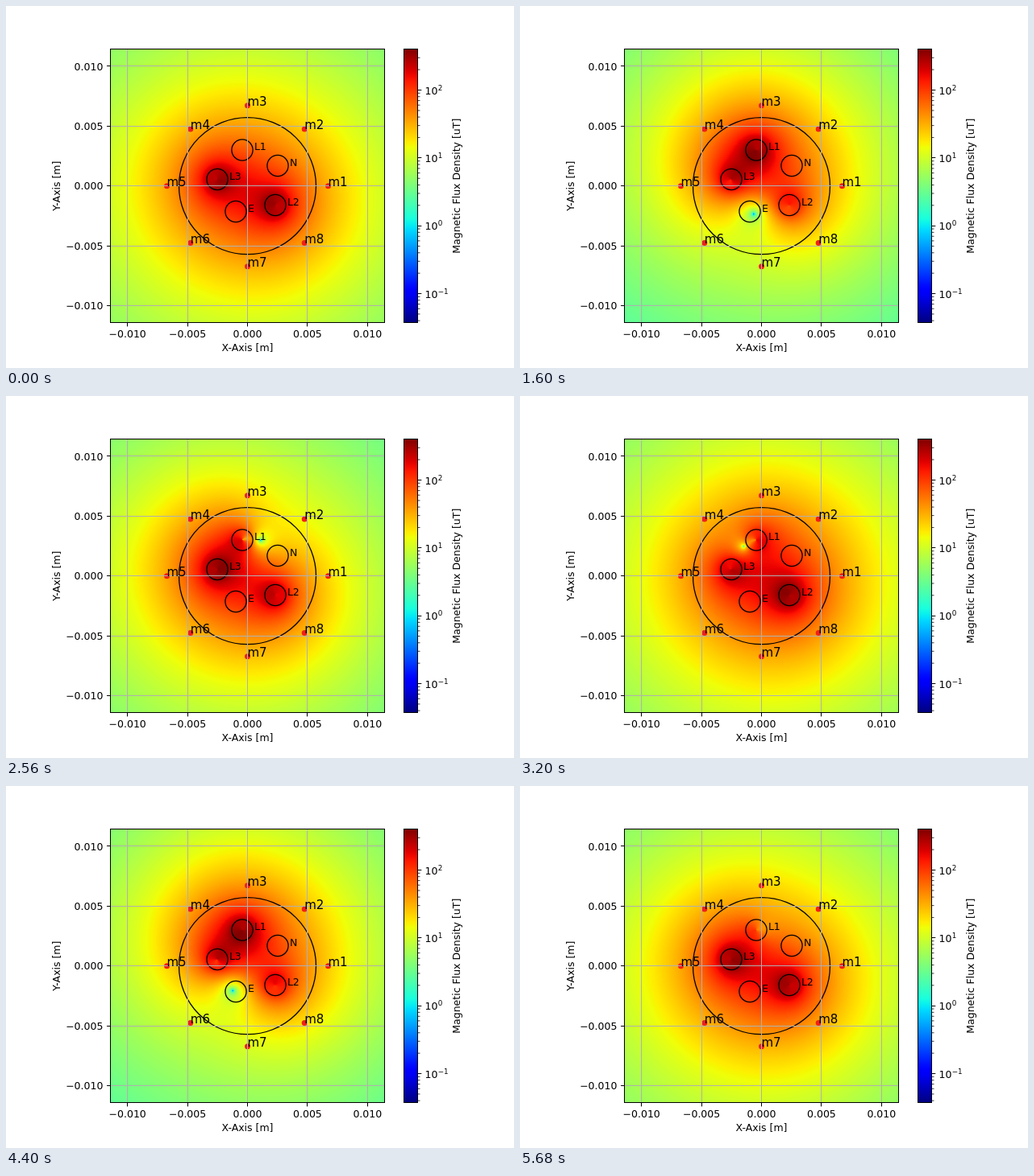
These frames come from a looping animation (630 px wide and 450 px high, 5.76 s). An HTML page with a canvas:

```html
<!DOCTYPE html>
<html lang="en">
<head>
<meta charset="utf-8">
<title>Magnetic flux density of a cable</title>
<style>
  html, body { margin: 0; width: 100%; height: 100%; overflow: hidden; background: #fff; }
  #stage { position: relative; width: 630px; height: 450px; overflow: hidden; }
  canvas { position: absolute; left: 130px; top: 54px; }
  svg { position: absolute; left: 0; top: 0; font: 12.5px "DejaVu Sans", sans-serif; }
</style>
</head>
<body>
<div id="stage">
  <canvas id="field" width="340" height="340"></canvas>
  <svg id="plot" width="630" height="450" viewBox="0 0 630 450"></svg>
</div>
<script>
const STEP = 80, STEPS = 72;
const CX = 299.5, CY = 223.7, PX_PER_MM = 14.88;
const LOG_MIN = -1.427, LOG_MAX = 2.599;
const WIRE_R = 13.1;
const PEAK = 0.2 * Math.SQRT2 * 1000 * PX_PER_MM;   // uT at 1 px for 1 A rms

// phase is in degrees; conductors without one carry no current
const wires = [
  { name: "L1", x: 293, y: 179, phase: 0 },
  { name: "L2", x: 334, y: 247.5, phase: -120 },
  { name: "L3", x: 262, y: 215.5, phase: 120 },
  { name: "N", x: 337, y: 198.5 },
  { name: "E", x: 285, y: 255.5 }
];
const phases = wires.filter(w => "phase" in w);

// Jet colour map as piecewise linear channels
const ramp = (pts, v) => {
  if (v <= pts[0][0]) return pts[0][1];
  for (let i = 1; i < pts.length; i++) {
    const [a, p] = pts[i - 1], [b, q] = pts[i];
    if (v <= b) return p + (q - p) * (v - a) / (b - a);
  }
  return pts[pts.length - 1][1];
};
const channels = [
  [[.35, 0], [.66, 1], [.89, 1], [1, .5]],
  [[.125, 0], [.375, 1], [.64, 1], [.91, 0]],
  [[0, .5], [.11, 1], [.34, 1], [.65, 0]]
];
const jet = v => channels.map(c => Math.round(255 * ramp(c, v)));
const lut = Array.from({ length: 256 }, (_, i) => {
  const [r, g, b] = jet(i / 255);
  return (255 << 24 | b << 16 | g << 8 | r) >>> 0;
});

// Static plot parts
const svg = document.getElementById("plot");
function add(tag, attrs, text, parent = svg) {
  const el = document.createElementNS("http://www.w3.org/2000/svg", tag);
  for (const k in attrs) el.setAttribute(k, attrs[k]);
  if (text) el.textContent = text;
  parent.appendChild(el);
  return el;
}
const line = (x1, y1, x2, y2, stroke = "#000", width = 1) =>
  add("line", { x1, y1, x2, y2, stroke, "stroke-width": width });
const label = (text, x, y, anchor = "start", extra = {}) =>
  add("text", { x, y, "text-anchor": anchor, ...extra }, text);
const ring = (cx, cy, r) =>
  add("circle", { cx, cy, r, fill: "none", stroke: "#000", "stroke-width": 1.3 });
const box = (x, y, width, height, fill = "none") =>
  add("rect", { x, y, width, height, fill, stroke: "#000" });
const snap = v => Math.floor(v) + 0.5;

ring(CX, CY, 85);
wires.forEach(w => ring(w.x, w.y, WIRE_R));

const sensors = Array.from({ length: 8 }, (_, i) => {
  const a = i * Math.PI / 4;
  return { name: "m" + (i + 1), x: CX + 100 * Math.cos(a), y: CY - 100 * Math.sin(a) };
});
sensors.forEach(s => add("circle", { cx: s.x, cy: s.y, r: 3.5, fill: "#f02018" }));

const ticks = [-10, -5, 0, 5, 10].map(mm => ({
  text: (mm < 0 ? "\u2212" : "") + (Math.abs(mm) / 1000).toFixed(3),
  x: CX + mm * PX_PER_MM,
  y: CY - mm * PX_PER_MM
}));
ticks.forEach(t => {
  const x = snap(t.x), y = snap(t.y);
  line(x, 54, x, 393.5, "#b0b0b0");
  line(130, y, 469.5, y, "#b0b0b0");
  line(x, 394, x, 398.4);
  line(125, y, 129.5, y);
  label(t.text, t.x, 412, "middle");
  label(t.text, 120.4, t.y + 4.6, "end");
});
box(129.5, 53.5, 340, 340);

sensors.forEach(s => label(s.name, s.x, Math.ceil(s.y), "start", { "font-size": 15 }));
wires.forEach(w => label(w.name, w.x + 14.9, w.y));

label("X-Axis [m]", CX, 429, "middle");
const upright = (text, x) =>
  label(text, 0, 0, "middle", { transform: `translate(${x} ${CY}) rotate(-90)` });
upright("Y-Axis [m]", 67);
upright("Magnetic Flux Density [uT]", 563);

// Colour bar
const grad = add("linearGradient", { id: "jet", x1: 0, y1: 1, x2: 0, y2: 0 });
for (let i = 0; i <= 50; i++)
  add("stop", { offset: i / 50, "stop-color": `rgb(${jet(i / 50)})` }, "", grad);
box(493.5, 53.5, 17, 340, "url(#jet)");

const barY = log => 104.5 - 84.35 * (log - 2);
for (let d = -2; d <= 2; d++) {
  for (let m = 1; m < 10; m++) {
    const log = d + Math.log10(m);
    if (log < LOG_MIN || log > LOG_MAX) continue;
    const y = m === 1 ? snap(barY(log)) : barY(log);
    line(511, y, m === 1 ? 515.3 : 513.5, y, "#000", m === 1 ? 1 : 0.75);
  }
  if (d < LOG_MIN) continue;
  const y = barY(d) + 5;
  label("10", 519.5, y);
  label(String(d).replace("-", "\u2212"), 535.7, y - 4.8, "start", { "font-size": 8.75 });
}

// Field of the three phase currents on a logarithmic colour scale.
// Inside a wire the strength stays at its surface value.
const canvas = document.getElementById("field");
const ctx = canvas.getContext("2d");
const size = canvas.width;
const img = ctx.createImageData(size, size);
const pixels = new Uint32Array(img.data.buffer);

function drawField(step) {
  const angle = step * 360 / STEPS;
  const amps = phases.map(w => Math.sin((angle + w.phase) * Math.PI / 180));
  const scale = 255 / (LOG_MAX - LOG_MIN);
  for (let j = 0, n = 0; j < size; j++) {
    for (let i = 0; i < size; i++, n++) {
      let bx = 0, by = 0;
      for (let k = 0; k < 3; k++) {
        const dx = i + 130.5 - phases[k].x, dy = j + 54.5 - phases[k].y;
        const r = Math.sqrt(dx * dx + dy * dy);
        const f = amps[k] / (r * Math.max(r, WIRE_R));
        bx += f * dx;
        by += f * dy;
      }
      const log = Math.log10(PEAK * Math.sqrt(bx * bx + by * by) + 1e-9);
      const c = Math.round((log - LOG_MIN) * scale);
      pixels[n] = lut[c < 0 ? 0 : c > 255 ? 255 : c];
    }
  }
  ctx.putImageData(img, 0, 0);
}

const start = performance.now();
let shown = -1;
function tick() {
  const step = Math.floor((performance.now() - start) / STEP) % STEPS;
  if (step !== shown) drawField(shown = step);
  requestAnimationFrame(tick);
}
tick();
</script>
</body>
</html>
```
